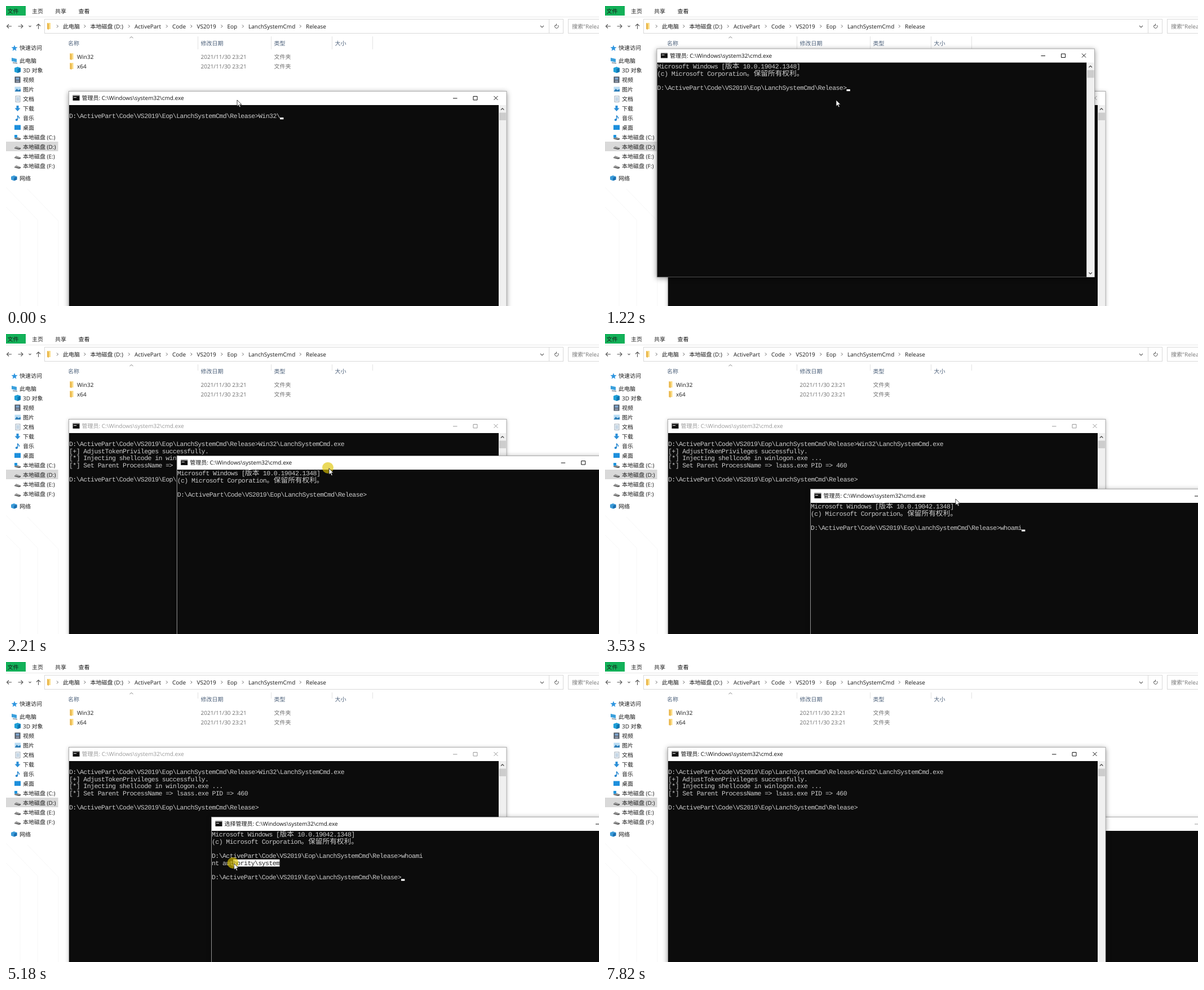
An HTML page that plays this animation: 1052x533 px, repeating every 8000 ms.

```html
<!DOCTYPE html>
<html lang="zh">
<head>
<meta charset="utf-8">
<title>Console demo</title>
<style>
html, body { margin: 0; width: 100%; height: 100%; overflow: hidden; background: #fff; }
svg { display: block; width: 1052px; height: 533px; text-rendering: geometricPrecision; }
text { white-space: pre; }
.ui { font: 10px "Open Sans", "Noto Sans CJK SC", "Noto Sans CJK", sans-serif; }
.mono { font: 11.5px "Liberation Mono", "Courier New", monospace; letter-spacing: -0.561px; }
.cjk { font: 12.68px "Noto Sans CJK SC", "Noto Sans CJK", sans-serif; font-weight: 300; }
.frame { filter: drop-shadow(0 2px 5px rgba(0,0,0,.42)); }
.idle .frame { filter: drop-shadow(0 1px 3px rgba(0,0,0,.25)); }
.title { fill: #111; }
.idle .title { fill: #999; }
.btn { fill: none; stroke: #111; }
.idle .btn { stroke: #999; }
</style>
</head>
<body>
<svg id="stage" viewBox="0 0 1052 533"></svg>
<script>
const NS = 'http://www.w3.org/2000/svg';
const stage = document.getElementById('stage');
const LOOP = 8000, TICK = 110, CELL = 6.34, LINE = 12.68, TOP = 24.5;
const PROMPT = 'D:\\ActivePart\\Code\\VS2019\\Eop\\LanchSystemCmd\\Release>';
const REPLY = 'nt authority\\system';

function el(parent, tag, attrs = {}, text) {
  const node = document.createElementNS(NS, tag);
  for (const key in attrs) node.setAttribute(key, attrs[key]);
  if (text) node.textContent = text;
  parent.appendChild(node);
  return node;
}
const rect = (p, x, y, width, height, fill, more) => el(p, 'rect', { x, y, width, height, fill, ...more });
const line = (p, d, stroke, w = 1) => el(p, 'path', { d, stroke, fill: 'none', 'stroke-width': w });
const shape = (p, d, fill) => el(p, 'path', { d, fill });
// y is the middle of the text row
const ui = (p, x, y, text, fill = '#1a1a1a') => el(p, 'text', { class: 'ui', x, y: y + 3.6, fill }, text);
const show = (node, on) => node.setAttribute('visibility', on ? 'inherit' : 'hidden');

// ---- file browser ----
const desk = el(stage, 'g');
rect(desk, 0, 0, 1052, 533, '#fff');
line(desk, 'M0 322L56 380V533M38 325L93 382V533M0 357L25 382V533', '#f7f7f7');
rect(desk, 0, 0, 35, 17, '#13b159');
[['文件', 2.5], ['主页', 46], ['共享', 87], ['查看', 128.5]].forEach(([s, x]) => ui(desk, x, 9, s));
line(desk, 'M0 19.5H1052', '#e8e8e8');

rect(desk, 68.5, 23.5, 920, 25, 'none', { stroke: '#d9d9d9' });
rect(desk, 997.5, 23.5, 60, 25, 'none', { stroke: '#d9d9d9' });
line(desk, 'M963.5 23.5v25', '#d9d9d9');
line(desk, 'M10 36h-8.5m3.5 -3.5l-3.5 3.5l3.5 3.5', '#555', 1.1);
line(desk, 'M21.5 36h8.5m-3.5 -3.5l3.5 3.5l-3.5 3.5', '#555', 1.1);
line(desk, 'M57.5 41v-9m-3.5 3.5l3.5 -3.5l3.5 3.5', '#555', 1.1);
line(desk, 'M40.5 35l2 2l2 -2M948 35l3 3l3 -3', '#666', 1.1);
line(desk, 'M979 34A3.2 3.2 0 1 1 975 33.6m1.5 -2v3h-2.7', '#555');
ui(desk, 1004, 36, '搜索"Release"', '#767676');

function folder(x, y) {
  rect(desk, x, y - 6, 6, 11, '#fbdc85');
  shape(desk, `M${x} ${y - 6}l3 2v10l-3 -1z`, '#e9b64a');
}
folder(73, 36);
[['此电脑', 101], ['本地磁盘 (D:)', 149.5], ['ActivePart', 228], ['Code', 295], ['VS2019', 338.5],
 ['Eop', 392.5], ['LanchSystemCmd', 430], ['Release', 532]].forEach(([s, x]) => {
  ui(desk, x, 36, s);
  line(desk, `M${x - 11} 33.5l2.5 2.5l-2.5 2.5`, '#666');
});

[['名称', 110], ['修改日期', 345.5], ['类型', 475.5], ['大小', 583.5]].forEach(([s, x]) => ui(desk, x, 66, s, '#4c607a'));
line(desk, 'M219.5 57l3 -2.5l3 2.5', '#777', .9);
const rules = line(desk, '', '#e2e2e2');
[['Win32', 90], ['x64', 107]].forEach(([s, y]) => {
  folder(113.5, y);
  ui(desk, 126, y, s);
  ui(desk, 345.5, y, '2021/11/30 23:21', '#6d6d6d');
  ui(desk, 475.5, y, '文件夹', '#6d6d6d');
});

// ---- sidebar ----
rect(desk, 0, 241, 92.5, 17, '#d9d9d9');
[['快速访问', 74.5], ['此电脑', 97.5], ['网络', 306.5]].forEach(([s, y]) => ui(desk, 24, y, s));
['3D 对象', '视频', '图片', '文档', '下载', '音乐', '桌面', '本地磁盘 (C:)', '本地磁盘 (D:)', '本地磁盘 (E:)', '本地磁盘 (F:)']
  .forEach((s, i) => ui(desk, 30, 114 + 17 * i, s));

const star = Array.from({ length: 10 }, (_, i) => {
  const r = i % 2 ? 2.5 : 5.8, a = Math.PI * i / 5;
  return `${15 + r * Math.sin(a)} ${75 - r * Math.cos(a)}`;
});
shape(desk, `M${star.join('L')}z`, '#2f96e0');
shape(desk, 'M10 92l9 2v6l-9 -2z', '#3aa0dc');
shape(desk, 'M12 100l8 1v1.5l-8 -1z', '#7b8b99');
function box(x, y, w, h, light, dark) {
  shape(desk, `M${x} ${y}l${w} -2l${w} 2v${h}l${-w} 2l${-w} -2z`, light);
  shape(desk, `M${x + w} ${y + 2}l${w} -2v${h}l${-w} 2z`, dark);
}
box(15, 110, 5.5, 7, '#1fa0d8', '#0d76b0');
box(9, 303, 5.2, 5.5, '#3b9bd8', '#1b6fb0');
rect(desk, 15.5, 125.5, 10, 11, '#4b5560');
rect(desk, 17.5, 127, 6, 4, '#7fa6cf');
rect(desk, 17.5, 132, 6, 3.5, '#8d96a8');
rect(desk, 15.5, 143.5, 10.5, 8.5, '#b9dcf3');
shape(desk, 'M15.5 152l3.5 -5l3 2.5l4 -2v4.5z', '#2f7fb8');
rect(desk, 17, 160, 8, 10.5, '#f4f7fa', { stroke: '#8a9aa8', 'stroke-width': .8 });
line(desk, 'M18.5 163h5m-5 2.3h5m-5 2.3h5', '#6b9ac0', .8);
shape(desk, 'M18.5 177h4v4.5h3l-5 5.5l-5 -5.5h3z', '#2a8fd8');
line(desk, 'M20.5 202v-7.5c.5 2 3.5 2 3 5.5', '#2486cf', 1.4);
el(desk, 'circle', { cx: 18.8, cy: 202.3, r: 2, fill: '#2486cf' });
rect(desk, 15, 211.5, 11, 8.5, '#1d8fdc');
for (let i = 0; i < 4; i++) {
  const y = 235 + 17 * i;
  shape(desk, `M15 ${y}l3 -3l8 3l-3 2z`, '#9a9a9a');
  shape(desk, `M15 ${y}l8 1.6l3 -1.6v2l-3 1l-8 -2z`, '#444');
}
rect(desk, 15, 229, 5, 5, '#1f95de');

// ---- console windows ----
function runs(parent, col, row, text, fill = '#ccc') {
  for (const part of text.match(/[\u3000-\u9fff]+|[^\u3000-\u9fff]+/g) || []) {
    const wide = part.charCodeAt(0) >= 0x3000;
    el(parent, 'text', { class: wide ? 'cjk' : 'mono', x: col * CELL, y: TOP + row * LINE + 10.4, fill }, part);
    col += part.length * (wide ? 2 : 1);
  }
}

function consoleWindow() {
  const g = el(stage, 'g');
  rect(g, -.5, 0, 776.5, 405.5, '#fff', { class: 'frame', stroke: '#999', 'stroke-width': .8 });
  rect(g, 0, TOP, 762, 381, '#0c0c0c');
  rect(g, 762, TOP, 13, 381, '#f0f0f0');
  rect(g, 763, 38, 12, 13.5, '#cdcdcd');
  line(g, 'M766 33l2.7 -2.7l2.7 2.7M766 397.5l2.7 2.7l2.7 -2.7', '#444', 1.2);
  rect(g, 6.5, 7, 12, 9.5, '#111');
  rect(g, 6.5, 7, 12, 1.5, '#9a9a9a');
  line(g, 'M8 11h5', '#eee');
  const title = el(g, 'text', { class: 'ui title', x: 22.5, y: 15.6 });
  el(g, 'path', { class: 'btn', d: 'M681 12.5h7.5M717 9h7v6.5h-7zM753.5 8.5l7 7m0 -7l-7 7' });
  const body = el(g, 'g');
  const caret = rect(g, 0, 0, CELL, 3.2, '#fff');
  let last = '';
  return {
    g, body,
    caret(on, col, row) {
      show(caret, on);
      caret.setAttribute('x', col * CELL);
      caret.setAttribute('y', TOP + (row + 1) * LINE - 3.2);
    },
    focus(on) { g.setAttribute('class', on ? '' : 'idle'); },
    name(prefix) { title.textContent = prefix + '管理员: C:\\Windows\\system32\\cmd.exe'; },
    print(key, draw) {
      if (key === last) return;
      last = key;
      body.textContent = '';
      draw();
    }
  };
}
const first = consoleWindow(), second = consoleWindow();
first.g.setAttribute('transform', 'translate(112 151.5)');
first.name('');

const halo = el(stage, 'circle', { r: 10, fill: 'rgba(222,196,0,.64)' });
const mouse = el(stage, 'path', {
  d: 'M0 0v11.2l2.6 -2.4l1.8 4l1.8 -.8l-1.8 -3.9h3.5z', fill: '#fff', stroke: '#111', 'stroke-width': .8
});

// ---- motion: time, then values ----
const pointer = [
  [1440, 410, 167], [1660, 350, 93], [1770, 350, 93], [1990, 475, 130], [2320, 622, 293],
  [3970, 622, 293], [4190, 600, 309], [4630, 478, 358], [4850, 482, 358], [5180, 404.5, 358],
  [5510, 361, 358], [5730, 359, 358], [6280, 153, 250], [6720, 244, 237],
  [7050, 250, 236], [7490, 436, 193], [7710, 980, 485], [7820, -50, -50]
];
const drag = [[1770, 92.5, 76], [1990, 181, 98.5], [2320, 365, 275.5]];
const open = [[890, .95, 0], [1000, .963, .24], [1110, .988, .75], [1220, 1, 1]];

function along(keys, t) {
  const now = 10 + Math.floor((t - 10) / TICK) * TICK;
  const i = keys.findIndex(k => k[0] > now);
  if (i === 0) return keys[0].slice(1);
  if (i < 0) return keys[keys.length - 1].slice(1);
  const a = keys[i - 1], b = keys[i], f = (now - a[0]) / (b[0] - a[0]);
  return a.slice(1).map((v, k) => v + (b[k + 1] - v) * f);
}
const within = (t, from, to) => t >= from && t < to;

function render(t) {
  const bottom = t < 1550 ? 77 : 65;
  rules.setAttribute('d', [340.5, 470.5, 578.5, 650.5].map(x => `M${x} 54V${bottom}`).join(''));

  const pasted = t >= 220, ran = t >= 890, raised = t >= 6940;
  first.print(`${pasted}${ran}`, () => {
    const body = first.body;
    runs(body, 0, 1, PROMPT + 'Win32\\' + (pasted ? 'LanchSystemCmd.exe' : ''));
    if (!ran) return;
    runs(body, 0, 2, '[+] AdjustTokenPrivileges successfully.');
    runs(body, 0, 3, '[*] Injecting shellcode in winlogon.exe ...');
    runs(body, 0, 4, '[*] Set Parent ProcessName => lsass.exe PID => 460');
    runs(body, 0, 6, PROMPT);
  });
  if (ran) first.caret(within(t, 6940, 7600), 53, 6);
  else first.caret(true, pasted ? 77 : 59, 1);

  first.focus(t < 1000 || raised);
  second.focus(!raised);
  const back = raised ? second : first, front = raised ? first : second;
  if (back.g.nextSibling !== front.g) stage.insertBefore(back.g, front.g);

  const [x, y] = along(drag, t), [size, alpha] = along(open, t);
  second.g.setAttribute('transform', `translate(${x + 388 * (1 - size)} ${y + 203 * (1 - size)}) scale(${size})`);
  second.g.setAttribute('opacity', alpha);
  second.name(t >= 4960 ? '选择' : '');

  const [mx, my] = along(pointer, t);
  const typed = Math.max(0, Math.min(6, Math.floor((t - 2870) / TICK) + 1));
  const done = t >= 3860;
  let from = REPLY.length;
  if (t >= 5510) from = 0;
  else if (t >= 4960) from = Math.max(0, Math.floor((mx - 365) / CELL));
  second.print(`${typed} ${done} ${from}`, () => {
    const body = second.body;
    runs(body, 0, 0, 'Microsoft Windows [版本 10.0.19042.1348]');
    runs(body, 0, 1, '(c) Microsoft Corporation。保留所有权利。');
    runs(body, 0, 3, PROMPT + 'whoami'.slice(0, typed));
    if (!done) return;
    rect(body, from * CELL, TOP + 4 * LINE, (REPLY.length - from) * CELL, LINE, '#fff');
    runs(body, 0, 4, REPLY.slice(0, from));
    runs(body, from, 4, REPLY.slice(from), '#222');
    runs(body, 0, 6, PROMPT);
  });
  const blink = t < 1550 || within(t, 2430, 5840);
  second.caret(blink, done ? 53 : 53 + typed, done ? 6 : 3);

  mouse.setAttribute('transform', `translate(${mx} ${my})`);
  halo.setAttribute('cx', mx - 2);
  halo.setAttribute('cy', my - 1);
  show(halo, within(t, 1770, 2430) || within(t, 4850, 5840) || within(t, 6940, 7160));
}

const begin = performance.now();
function tick() {
  render((performance.now() - begin) % LOOP);
  requestAnimationFrame(tick);
}
tick();
</script>
</body>
</html>
```
